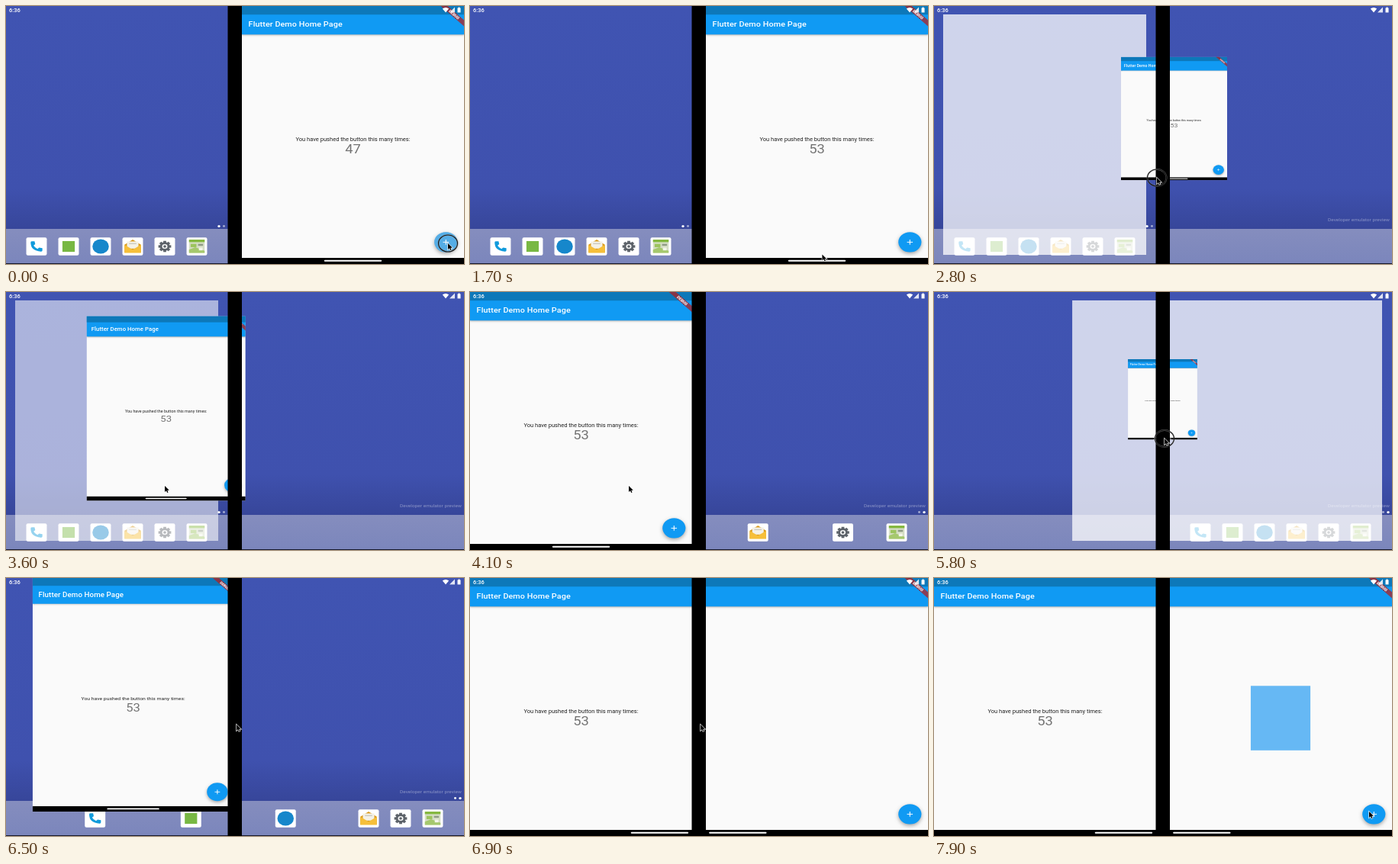
An HTML page with a canvas that plays this animation: 600x338 px, repeating every 8000 ms.

```html
<!DOCTYPE html>
<html lang="en">
<head>
<meta charset="utf-8">
<title>Dual-screen counter</title>
<style>
  html, body { margin: 0; width: 100%; height: 100%; overflow: hidden; background: #000; }
  canvas { display: block; width: 600px; height: 338px; }
</style>
</head>
<body>
<canvas id="stage" width="600" height="338"></canvas>
<script>
const ctx = document.getElementById('stage').getContext('2d');
const LOOP = 8000, STEP = 100;
const W = 600, H = 338, PANE = 291;
const HINGE_LEFT = 290.5, HINGE_RIGHT = 309;
// Each pane is 540 x 720 device units, shown slightly wide.
const SX = PANE / 540, SY = H / 720, SPAN = W / SX;
const BLUE = '#109af3';
const RELEASE_1 = 3500, RELEASE_2 = 6262, SETTLE = 310;

const mix = (a, b, p) => a + (b - a) * p;
const ramp = (t, a, b) => Math.min(1, Math.max(0, (t - a) / (b - a)));
const smooth = p => p * p * (3 - 2 * p);

function rect(x, y, w, h, color) {
  ctx.fillStyle = color;
  ctx.fillRect(x, y, w, h);
}

function roundRect(x, y, w, h, r, color) {
  ctx.beginPath();
  ctx.roundRect(x, y, w, h, r);
  ctx.fillStyle = color;
  ctx.fill();
}

function ellipse(x, y, rx, ry, color) {
  ctx.beginPath();
  ctx.ellipse(x, y, rx, ry, 0, 0, 7);
  ctx.fillStyle = color;
  ctx.fill();
}

function path(d, color) {
  ctx.fillStyle = color;
  ctx.fill(new Path2D(d));
}

function text(str, x, y, size, color, { weight = 400, align = 'left', spacing = 0 } = {}) {
  ctx.font = `${weight} ${size}px Roboto, sans-serif`;
  ctx.letterSpacing = spacing + 'px';
  ctx.textAlign = align;
  ctx.fillStyle = color;
  ctx.fillText(str, x, y + size * 0.355);
}

// Runs draw() with device units, origin at x, y.
function inUnits(x, y, scale, draw) {
  ctx.save();
  ctx.translate(x, y);
  ctx.scale(scale * SX, scale * SY);
  draw();
  ctx.restore();
}

function shadow(blur, offset, draw) {
  ctx.save();
  ctx.shadowColor = 'rgba(0,0,0,.35)';
  ctx.shadowBlur = blur;
  ctx.shadowOffsetY = offset;
  draw();
  ctx.restore();
}

// Pointer: time, x, y
const POINTER = [
  [0, 579, 311], [1300, 579, 311], [1800, 432, 329], [2100, 432, 329],
  [2800, 292, 225], [3000, 290, 225], [3400, 208, 254], [4100, 208, 254],
  [4800, 148, 329], [5000, 148, 329], [5300, 249, 224], [5800, 302, 192],
  [7400, 302, 192], [7500, 322, 195], [7600, 514, 297], [7700, 514, 297],
  [7800, 573, 313], [7900, 570, 306]
];

function pointerAt(t) {
  const next = POINTER.findIndex(k => k[0] > t);
  if (next < 0) return POINTER.at(-1).slice(1);
  const a = POINTER[next - 1], b = POINTER[next], p = ramp(t, a[0], b[0]);
  return [mix(a[1], b[1], p), mix(a[2], b[2], p)];
}

const tapping = t => t < 1100 && t % 200 < 100;
const pressed = t => tapping(t) || (t >= 1900 && t < RELEASE_1) || (t >= 4900 && t < RELEASE_2);
const countAt = t => Math.min(53, 47 + Math.floor((t + 100) / 200));

// Window poses: centre x, top, scale
const LEFT = { cx: PANE / 2, top: 0, scale: 1 };
const RIGHT = { cx: W - PANE / 2, top: 0, scale: 1 };

function blend(a, b, p, topP = p) {
  return { cx: mix(a.cx, b.cx, p), top: mix(a.top, b.top, topP), scale: mix(a.scale, b.scale, p) };
}

function dragged(from, startX, t) {
  const [x, y] = pointerAt(t), lift = 329 - y;
  const scale = 1 - lift * 0.00502;
  return { cx: from.cx + x - startX, top: H - lift * 1.055 - scale * H, scale };
}

function settle(pose, t, start) {
  const p = smooth(ramp(t, start, start + SETTLE));
  return blend(pose, LEFT, p, Math.min(1, p * 1.4));
}

function windowAt(t) {
  if (t < RELEASE_1) return blend(RIGHT, dragged(RIGHT, 432, t), ramp(t, 2200, 2400));
  if (t < 4500) return settle(dragged(RIGHT, 432, RELEASE_1), t, RELEASE_1);
  if (t < RELEASE_2) return blend(LEFT, dragged(LEFT, 148, t), ramp(t, 5300, 5500));
  return settle(dragged(LEFT, 148, RELEASE_2), t, RELEASE_2);
}

const ICONS = [
  () => {
    ctx.translate(-19, -19);
    ctx.scale(1.58, 1.58);
    path('M5 3h4l1 5-2.5 2.5q2 4 6 6L16 14l5 1v4q0 2-2 2Q3 20 3 5q0-2 2-2z', '#119bdc');
  },
  () => rect(-15, -15, 30, 30, '#78b843'),
  () => ellipse(0, 0, 20, 20, '#1687cb'),
  () => {
    path('M-20-5L0-19 20-5V17H-20z', '#d99a1c');
    rect(-14, -14, 28, 20, '#f4f1e6');
    rect(-9, -9, 18, 2, '#b9b9b0');
    path('M-20-5L0 9 20-5V18H-20z', '#f6bf3a');
  },
  () => {
    for (let i = 0; i < 8; i++) {
      ctx.rotate(Math.PI / 4);
      rect(-3.5, -15.5, 7, 8, '#5d636a');
    }
    ellipse(0, 0, 12, 12, '#5d636a');
    ellipse(0, 0, 6.5, 6.5, '#fff');
    ellipse(0, 0, 3.5, 3.5, '#5d636a');
  },
  () => {
    rect(-19, -19, 38, 37, '#d5ddc4');
    rect(-19, -19, 38, 7, '#84b83e');
    rect(-15, -7, 14, 9, '#9cc45d');
    rect(3, -7, 12, 5, '#8e9a84');
    path('M-19 18V9L-4 2 19 12v6z', '#a5c86d');
    rect(5, 3, 9, 8, '#f3f5e9');
  }
];

function iconX(i, t) {
  const left = 40 + 42 * i, right = 349 + 42 * i;
  const toRight = smooth(ramp(t, 3700 + (5 - i) * 75, 4100 + (5 - i) * 75));
  const spread = i < 3 ? smooth(ramp(t, 6230 + i * 75, 6630 + i * 75)) : 0;
  return mix(mix(left, right, toRight), left, spread);
}

function drawHome(t) {
  const sky = ctx.createLinearGradient(0, 0, 0, 292);
  sky.addColorStop(0, '#4054b2');
  sky.addColorStop(0.82, '#3f51ae');
  sky.addColorStop(1, '#37469a');
  rect(0, 0, W, H, sky);
  const dock = ctx.createLinearGradient(0, 292, 0, H);
  dock.addColorStop(0, '#858dbe');
  dock.addColorStop(1, '#7b86bc');
  rect(0, 292, W, 45, dock);
  rect(0, 337, W, 1, '#15182b');

  inUnits(597, 280, 1, () =>
    text('Developer emulator preview', 0, 0, 12, 'rgba(255,255,255,.42)', { align: 'right', spacing: 0.1 }));

  const onRight = t >= 3900, dim = 'rgba(255,255,255,.55)';
  ellipse(onRight ? 595 : 279, 288.4, 1.7, 1.5, '#fff');
  ellipse(onRight ? 588.5 : 285.5, 288.4, 1.5, 1.3, t >= 6400 ? '#fff' : dim);

  ICONS.forEach((draw, i) => inUnits(iconX(i, t), 315, 1, () => {
    roundRect(-25, -25, 50, 50, 4, '#fff');
    draw();
  }));
}

function drawDropTarget(t) {
  const first = t < 4500;
  const alpha = first
    ? ramp(t, 2500, 2700) * (1 - ramp(t, RELEASE_1, 3900))
    : ramp(t, 5400, 5600) * (1 - ramp(t, RELEASE_2, 6460));
  const left = first ? 12 : mix(322, 12, ramp(t, 5700, 5920));
  const right = first ? 278 : 587;
  rect(left, 11, right - left, 315, `rgba(255,255,255,${alpha * 0.75})`);
}

function drawFab(x, y, scale, t) {
  shadow(5 * scale, 2 * scale, () => ellipse(x, y, 28, 28, BLUE));
  if (t < 1200) ellipse(x, y, 28, 28, `rgba(200,205,210,${tapping(t) ? 0.38 : 0.25})`);
  rect(x - 7, y - 1, 14, 2, '#fff');
  rect(x - 1, y - 7, 2, 14, '#fff');
}

function drawApp(t) {
  const { cx, top, scale } = windowAt(t);
  const span = smooth(ramp(t, 6700, 6900));
  const width = mix(540, SPAN, span);
  inUnits(cx - scale * PANE / 2, top, scale, () => {
    ctx.beginPath();
    ctx.rect(0, 0, width, 720);
    ctx.clip();
    rect(0, 0, width, 720, '#fafafa');
    shadow(2.5 * scale, scale, () => rect(0, 0, width, 79.5, BLUE));
    rect(0, 0, width, 24, '#0d78b9');
    text('Flutter Demo Home Page', 16, 51, 20, '#fff', { weight: 500, spacing: 0.15 });
    text('You have pushed the button this many times:', 270, 371.5, 14, 'rgba(0,0,0,.87)',
      { align: 'center' });
    text(countAt(t), 270, 399, 34, 'rgba(0,0,0,.54)', { align: 'center' });
    if (t >= 7000) rect(770, 301, 145, 180, '#66b8f4');
    drawFab(width - 44, 659, scale, t);

    rect(0, 703, width, 17, '#000');
    const pills = span === 1 ? [391, 581] : [width / 2 - 70];
    pills.forEach(x => roundRect(x, 709, 140, 4, 2, '#fff'));

    ctx.translate(width, 0);
    ctx.rotate(Math.PI / 4);
    rect(-45, 28, 90, 12, 'rgba(183,28,28,.72)');
    text('DEBUG', 0, 34, 10.2, '#fff', { weight: 900, align: 'center' });
  });
}

function drawStatus() {
  inUnits(4, 5.4, 1, () => text('6:36', 0, 0, 14, '#fff', { weight: 500 }));
  path('M571.8 3.6Q576 .4 580.2 3.6L576 8.6z', '#fff');
  path('M588 1.5V8.5H581z M587 4V7.5H583.4z', 'rgba(255,255,255,.85)');
  path('M591.5 2.5H592.7V1.6H594.3V2.5H595.5V8.5H591.5z', '#fff');
}

function drawPointer(t) {
  const [x, y] = pointerAt(t);
  if (pressed(t)) {
    ctx.beginPath();
    ctx.ellipse(x, y, 12.5, 11, 0, 0, 7);
    ctx.strokeStyle = 'rgba(150,150,150,.6)';
    ctx.lineWidth = 2;
    ctx.stroke();
    ctx.strokeStyle = 'rgba(0,0,0,.85)';
    ctx.lineWidth = 1.1;
    ctx.stroke();
  }
  ctx.save();
  ctx.translate(x, y);
  const arrow = new Path2D('M0 0V8L1.9 6.3 3.2 9 4.5 8.4 3.3 5.8H5.8z');
  ctx.strokeStyle = '#fff';
  ctx.lineWidth = 1.3;
  ctx.stroke(arrow);
  ctx.fillStyle = '#000';
  ctx.fill(arrow);
  ctx.restore();
}

function render(now) {
  const t = Math.floor((now % LOOP) / STEP) * STEP;
  drawHome(t);
  drawDropTarget(t);
  drawApp(t);
  rect(HINGE_LEFT, 0, HINGE_RIGHT - HINGE_LEFT, H, '#000');
  drawStatus();
  drawPointer(t);
}

const start = performance.now();
function tick() {
  render(performance.now() - start);
  requestAnimationFrame(tick);
}
tick();
</script>
</body>
</html>
```
